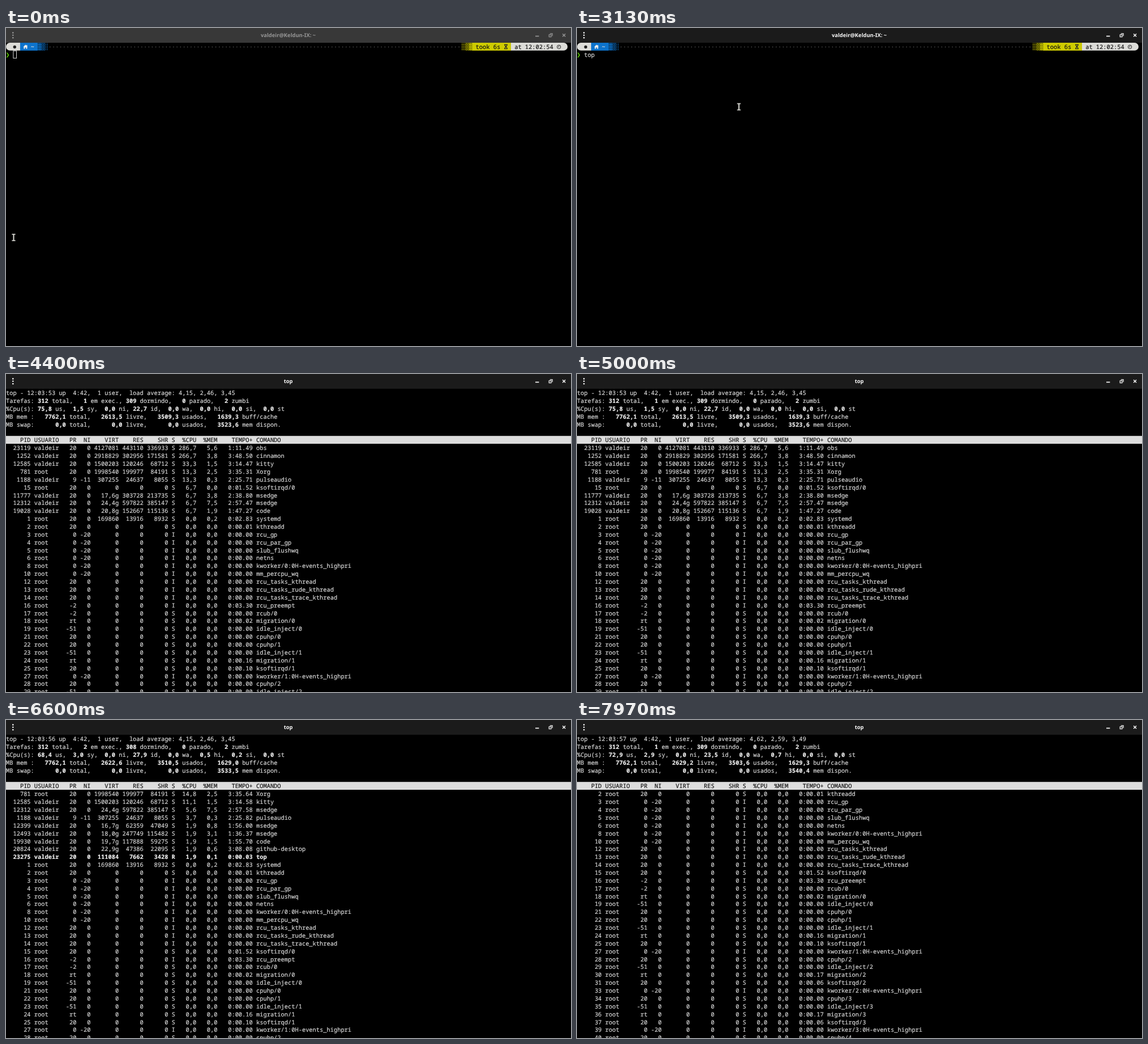
An HTML page for the animation above (8000 ms loop, 998 by 561 pixels).

```html
<!DOCTYPE html>
<html lang="pt">
<head>
<meta charset="utf-8">
<title>Terminal</title>
<style>
  html, body { margin: 0; width: 100%; height: 100%; overflow: hidden; background: #000; }
  svg { display: block; width: 100vw; height: 100vh; }
  text { white-space: pre; text-rendering: geometricPrecision; }
  .mono { font: 10.396px "Noto Sans Mono", "DejaVu Sans Mono", monospace;
          color: #ddd; fill: currentColor; stroke: currentColor; stroke-width: .16; }
  .mono.dark { color: #111; }
  .mono.b, .b { font-weight: 700; color: #f2f2f2; }
  .title { font: 700 9.4px "Noto Sans", "Open Sans", sans-serif; text-anchor: middle; }
</style>
</head>
<body>
<svg id="stage" viewBox="0 0 998 561" preserveAspectRatio="none">
  <defs id="defs"></defs>
  <rect width="998" height="561"/>
  <g id="screen"></g>
  <rect id="bar" width="998" height="26"/>
  <g id="chrome">
    <circle cx="12.3" cy="8.4" r="1.3"/>
    <circle cx="12.3" cy="12.8" r="1.3"/>
    <circle cx="12.3" cy="17.2" r="1.3"/>
    <rect x="935" y="13.6" width="6.4" height="1.7"/>
    <path d="M960.7 9.2h5v5h-1.2v-3.8h-3.8zM958.6 11.2h5v5h-5zm1.2 1.2v2.6h2.6v-2.6z" fill-rule="evenodd"/>
    <path id="close" d="M983.1 10.2l5 5m0-5l-5 5" stroke-width="1.5"/>
    <text id="title" class="title" x="498.6" y="16.4"></text>
  </g>
  <path id="cursor" fill="#ddd" fill-rule="evenodd"/>
  <path id="mouse" d="M-3.2-6.6H3.2V-4.6H1.2V4.6H3.2V6.6H-3.2V4.6H-1.2V-4.6H-3.2Z" fill="#dcdcd6" stroke="#222" stroke-width=".5"/>
</svg>
<script>
const LOOP = 8000, CW = 998 / 160, LH = 13.87, TOP = 26, BASE = 11.2;
const USER = 'valdeir', HOST = 'Keldun-IX';
const T = { moveIn: 270, moveOut: 1070, focus: 1100, blink: 1800, type: 2300, blink2: 3130,
            blink3: 3730, enter: 3770, hide: 4070 };
const $ = id => document.getElementById(id);
const clamp = v => Math.max(0, Math.min(1, v));
const mix = (a, b, k) => a + (b - a) * k;
const grey = (a, b, k) => { const v = Math.round(mix(a, b, k)); return `rgb(${v},${v},${v})`; };
const bold = s => `<tspan class="b">${s}</tspan>`;
const dec = v => v.toFixed(1).replace('.', ',');

function line(row, s, cls = '', col = 0) {
  return `<text class="mono ${cls}" x="${col * CW}" y="${TOP + BASE + row * LH}">${s}</text>`;
}

// Prompt ---------------------------------------------------------------
const BLUE = '#0d73cc', YELLOW = '#cecb00', LIGHT = '#dcdcd8';

const cells = [[0, 0], [1, 1], [1, 0]];
$('defs').innerHTML = [['b', BLUE], ['y', YELLOW]].map(([id, c]) => [1, 2, 3].map(n =>
  `<pattern id="${id}${n}" width="3.12" height="3.12" patternUnits="userSpaceOnUse">` +
  cells.slice(0, n).map(([x, y]) =>
    `<rect x="${x * 1.56}" y="${y * 1.56}" width="1.56" height="1.56" fill="${c}"/>`).join('') +
  '</pattern>').join('')).join('');

const block = (from, to, fill) =>
  `<rect x="${from * CW}" y="${TOP}" width="${(to - from) * CW}" height="${LH}" fill="${fill}"/>`;

function prompt(typed) {
  const mid = TOP + LH / 2, end = 143 * CW;
  return `<path d="M25 ${TOP}H7a6.9 6.9 0 0 0 0 ${LH}H25z" fill="${LIGHT}"/>` +
    `<circle cx="15.3" cy="${mid + .6}" r="2.7" fill="#222"/>` +
    block(4, 9, BLUE) + [3, 2, 1].map((n, i) => block(9 + i, 10 + i, `url(#b${n})`)).join('') +
    `<path d="M30.4 ${mid + .5}l4-4 1.8 1.8v-1.3h1.2v2.5l1 1h-1v3.2h-2v-2.4h-2v2.4h-2v-3.2z" fill="#eee"/>` +
    line(0, '~', '', 7) +
    `<g opacity=".42">${line(0, '·'.repeat(117), '', 12)}</g>` +
    [1, 2, 3].map((n, i) => block(129 + i, 130 + i, `url(#y${n})`)).join('') +
    block(132, 143, YELLOW) + line(0, 'took 6s', 'dark', 133) +
    `<path d="M880 ${mid - 3.6}h6m0 7.4h-6m.8-7.4c0 3 4.4 4.4 4.4 7.4m0-7.4c0 3-4.4 4.4-4.4 7.4" fill="none" stroke="#222" stroke-width="1.2"/>` +
    `<path d="M${end} ${TOP}H985a6.9 6.9 0 0 1 0 ${LH}H${end}z" fill="${LIGHT}"/>` +
    line(0, 'at 12:02:54', 'dark', 144) +
    `<circle cx="976.6" cy="${mid + .4}" r="3.2" fill="none" stroke="#222" stroke-width="1"/>` +
    `<path d="M976.6 ${mid - 1.6}v2.2h-1.8" fill="none" stroke="#222" stroke-width=".8"/>` +
    `<path d="M.8 ${TOP + LH + 3.6}h1.7l2.8 4.3-2.8 4.3h-1.7l2.6-4.3z" fill="#5fd700"/>` +
    line(1, typed, '', 2);
}

// Processes ------------------------------------------------------------
let seed = 7;
function rand(a, b) {
  seed = (seed * 16807) % 2147483647;
  return mix(a, b, seed / 2147483647);
}

const MEM = 7762.1, procs = [];

// Kernel threads use no memory; "ticks" is the CPU time spent before each refresh.
function kernel(pid, cmd, pr = 20, st = 'S', time = 0, ticks = []) {
  procs.push({ pid, cmd, pr, st, time, ticks, ni: pr === 0 ? -20 : 0, user: 'root',
               virt: 0, res: 0, shr: 0, mem: 0 });
}

function app(cmd, pid, mem, ticks, ni = 0) {
  const res = Math.round(mem * MEM * 10.24 + rand(-2000, 2000)), web = /msedge|code|github/.test(cmd);
  procs.push({ pid, cmd, mem, ticks, res, ni, pr: ni ? 9 : 20, st: cmd === 'top' ? 'R' : 'S',
               user: pid < 1000 ? 'root' : USER, shr: Math.round(res * rand(.3, .8)),
               virt: web ? dec(rand(16, 29)) + 'g' : Math.round(res * rand(7, 15)),
               time: cmd === 'top' ? 0 : Math.round(rand(1000, 30000)) });
}

kernel(1, 'systemd', 20, 'S', 283);
Object.assign(procs[0], { virt: 169860, res: 13916, shr: 8932, mem: .2 });
kernel(2, 'kthreadd', 20, 'S', 1);
['rcu_gp', 'rcu_par_gp', 'slub_flushwq', 'netns'].forEach((c, i) => kernel(3 + i, c, 0, 'I'));
kernel(8, 'kworker/0:0H-events_highpri', 0, 'I');
kernel(10, 'mm_percpu_wq', 0, 'I');
['', 'rude_', 'trace_'].forEach((c, i) => kernel(12 + i, `rcu_tasks_${c}kthread`, 20, 'I'));
kernel(15, 'ksoftirqd/0', 20, 'S', 151, [1]);
kernel(16, 'rcu_preempt', -2, 'I', 330);
kernel(17, 'rcub/0', -2);
kernel(18, 'migration/0', 'rt', 'S', 2);
kernel(19, 'idle_inject/0', -51);
kernel(21, 'cpuhp/0');
for (let n = 1, pid = 22; n < 5; n++, pid += 6) {
  kernel(pid, 'cpuhp/' + n);
  kernel(pid + 1, 'idle_inject/' + n, -51);
  kernel(pid + 2, 'migration/' + n, 'rt', 'S', n > 1 ? 17 : 16);
  kernel(pid + 3, 'ksoftirqd/' + n, 20, 'S', n > 1 ? 6 : 10);
  kernel(pid + 5, `kworker/${n}:0H-events_highpri`, 0, 'I');
}

app('obs', 23119, 5.6, [43, 300, 90]);
app('cinnamon', 1252, 3.8, [40, 287, 60]);
app('kitty', 12585, 1.5, [5, 5, 6]);
app('Xorg', 781, 2.5, [2, 25, 8]);
app('pulseaudio', 1188, .3, [2, 9, 2], -11);
app('msedge', 11777, 3.8, [1, 1]);
app('msedge', 12312, 7.5, [1, 8, 3]);
app('code', 19028, 1.9, [1]);
app('msedge', 12493, 3.1, [0, 4, 1]);
app('top', 23275, .1, [0, 2, 1]);
app('NetworkManager', 723, .3, [0, 1]);
app('msedge', 11885, 1.3, [0, 1]);
app('msedge', 12399, .8, [0, 1, 1]);
app('obs-ffmpeg-mux', 23259, .2, [0, 1]);
app('code', 19930, 1.5, [0, 0, 1]);
app('github-desktop', 20824, .6, [0, 0, 1]);

// Each key press scrolls one row and refreshes the list.
const REFRESH = [3950, 5730, 6270, 6800, 6980, 7160, 7340, 7600];
const KEYS = [0, 1, 2, 6, 7];
const interval = i => i ? (REFRESH[i] - REFRESH[i - 1]) / 1000 : .15;

function keyed(i, values) {
  const k = Math.max(1, KEYS.findIndex(n => n >= i));
  return mix(values[k - 1], values[k], (i - KEYS[k - 1]) / (KEYS[k] - KEYS[k - 1]));
}

// Total ticks after refresh i; steady programs go on at their last rate.
function spent(p, i) {
  const known = p.ticks.slice(0, i + 1).reduce((a, b) => a + b, 0);
  if (i < 3 || !p.ticks[1] || !p.ticks[2]) return known;
  return known + Math.floor(p.ticks[2] / interval(2) * (REFRESH[i] - REFRESH[2]) / 1000 + .1);
}

function clock(ticks) {
  const m = Math.floor(ticks / 6000), s = (ticks % 6000 / 100).toFixed(2);
  return `${m}:${s.padStart(5, '0')}`;
}

function row(p, i, r) {
  const used = p.used * 100 / interval(i) / 100;
  const running = p.st === 'R' || (i === 1 && /pulseaudio|ksoftirqd.0/.test(p.cmd));
  const pad = (v, n) => String(v).padStart(n);
  const s = pad(p.pid, 7) + ' ' + p.user.padEnd(9) + pad(p.pr, 3) + pad(p.ni, 4) +
    pad(p.virt, 8) + pad(p.res, 7) + pad(p.shr, 7) + ' ' + (running ? 'R' : p.st) +
    pad(dec(used), 6) + pad(dec(p.mem), 6) + pad(clock(p.time + spent(p, i)), 10) + ' ' + p.cmd;
  return line(r, s, running ? 'b' : '');
}

const fields = (head, nums, width, names) => head + nums.map((n, i) =>
  bold(String(n).padStart(width)) + ' ' + names[i]).join(',');

function table(i) {
  const sec = Math.floor(53.8 + (REFRESH[i] - REFRESH[0]) / 1000);
  const load = sec < 57 ? '4,15, 2,46, 3,45' : '4,62, 2,59, 3,49';
  const run = { 1: 4, 2: 2 }[i] || 1;
  const us = keyed(i, [75.8, 66.1, 68.4, 76.2, 72.9]), sy = keyed(i, [1.5, 2.6, 3, 3.5, 2.9]);
  const wa = i === 1 ? .2 : 0, hi = keyed(i, [0, .6, .5, .7, .7]), si = keyed(i, [0, .1, .2, 0, 0]);
  const cpu = [us, sy, 0, 100 - us - sy - wa - hi - si, wa, hi, si, 0];
  const used = keyed(i, [3509.3, 3514.2, 3510.5, 3502, 3503.6]);
  const cache = keyed(i, [1639.3, 1639.8, 1629, 1629, 1629.3]);
  const avail = (i < 2 ? 7032.9 : 7044) - used;
  const list = procs
    .map(p => ({ ...p, used: (spent(p, i) - (i ? spent(p, i - 1) : 0)) }))
    .sort((a, b) => b.used - a.used || a.pid - b.pid);

  return line(0, `top - 12:03:${sec} up  4:42,  1 user,  load average: ${load}`) +
    line(1, fields('Tarefas:', [312, run, 310 - run, 0, 2], 4, ['total', 'em exec.', 'dormindo', 'parado', 'zumbi'])) +
    line(2, fields('%Cpu(s):', cpu.map(dec), 5, 'us sy ni id wa hi si st'.split(' '))) +
    line(3, fields('MB mem :', [MEM, MEM - used - cache, used, cache].map(dec), 9, ['total', 'livre', 'usados', 'buff/cache'])) +
    line(4, fields('MB swap:', [0, 0, 0, avail].map(dec), 9, ['total', 'livre', 'usados', 'mem dispon.'])) +
    `<rect y="${TOP + 6 * LH}" width="998" height="${LH}" fill="#ddd"/>` +
    line(6, '    PID USUARIO   PR  NI    VIRT    RES    SHR S  %CPU  %MEM    TEMPO+ COMANDO', 'dark') +
    list.slice(i, i + 32).map((p, n) => row(p, i, 7 + n)).join('');
}

// Timeline -------------------------------------------------------------
let shown = '';
function setScreen(key, make) {
  if (key !== shown) { shown = key; $('screen').innerHTML = make(); }
}

function cursorPath(t, typed) {
  const y = TOP + LH;
  if (t < T.focus) return `M12.4 ${y}h6.6v${LH}h-6.6zm1 1v${LH - 2}h4.6v-${LH - 2}z`;
  const on = t < T.blink || (t >= T.type && t < T.blink2) || (t >= T.blink3 && t < T.enter);
  return on ? `M${(2 + typed) * CW + .4} ${y}h1.4v${LH}h-1.4z` : '';
}

function draw(t) {
  const step = REFRESH.filter(at => t >= at).length - 1;
  const typed = t < T.type ? 0 : Math.min(3, 1 + Math.floor((t - T.type) / 100));
  if (step >= 0) setScreen('top' + step, () => table(step));
  else setScreen('sh' + typed, () => prompt('top'.slice(0, typed)));

  const focus = 1 - (1 - clamp((t - T.focus) / 200)) ** 2;
  const ink = grey(150, 250, focus);
  $('bar').setAttribute('fill', grey(56, 27, focus));
  $('chrome').setAttribute('fill', ink);
  $('close').setAttribute('stroke', ink);
  $('title').textContent = t < T.enter ? `${USER}@${HOST}: ~` : 'top';
  $('cursor').setAttribute('d', step >= 0 ? '' : cursorPath(t, typed));

  const k = clamp((t - T.moveIn) / (T.moveOut - T.moveIn)), e = k * k * (3 - 2 * k);
  $('mouse').setAttribute('transform', `translate(${mix(13.5, 286, e)} ${mix(369.5, 139, e)})`);
  $('mouse').setAttribute('visibility', t < T.hide ? 'visible' : 'hidden');
}

const start = performance.now();
function tick() {
  draw((performance.now() - start) % LOOP);
  requestAnimationFrame(tick);
}
tick();
</script>
</body>
</html>
```
